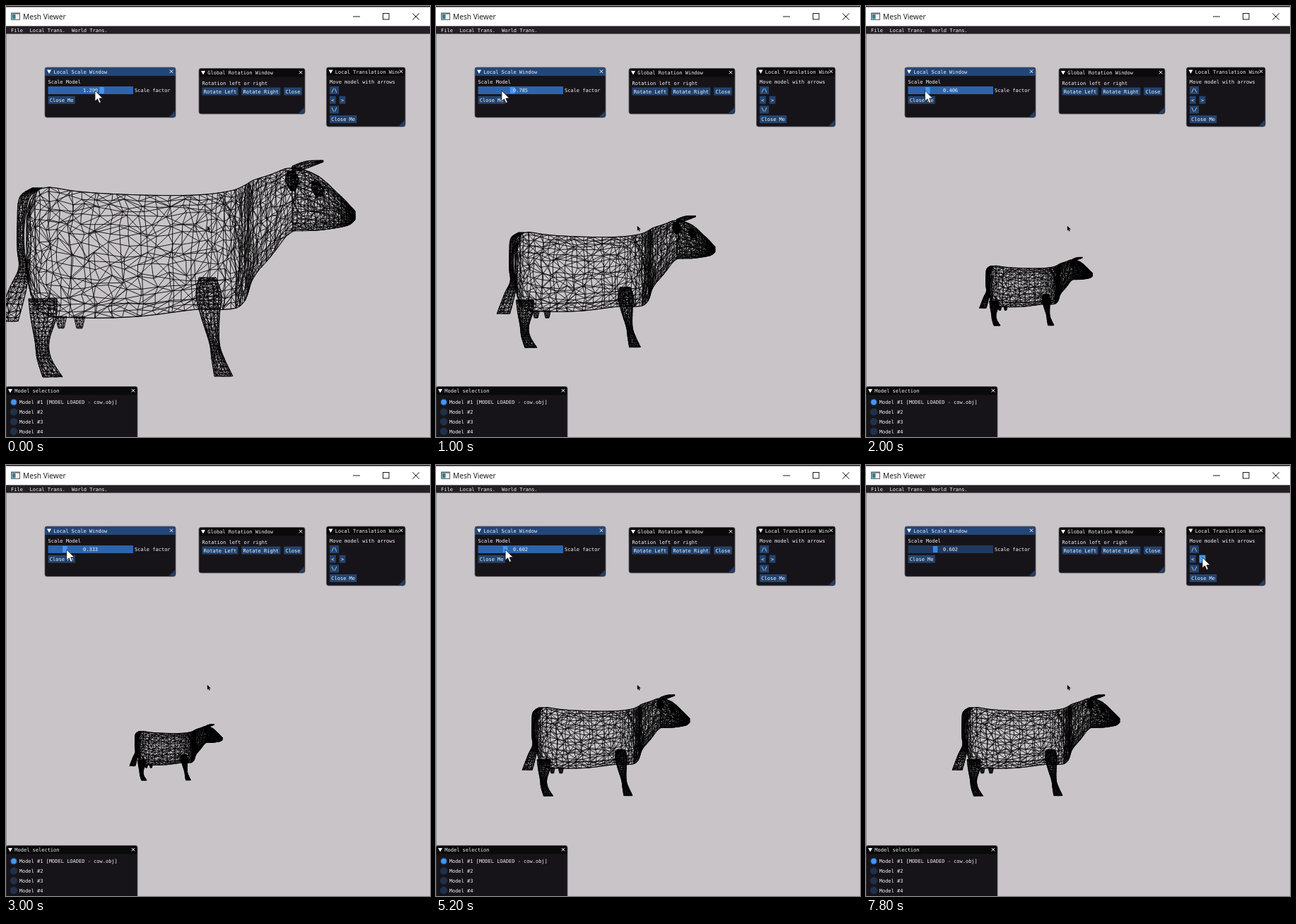
An HTML page with a canvas for the animation above (8 s loop, 600 px wide and 611 px high).

```html
<!DOCTYPE html>
<html lang="en">
<head>
<meta charset="utf-8">
<title>Mesh Viewer</title>
<style>
  html, body { margin: 0; width: 100%; height: 100%; overflow: hidden; background: #c8c4c8; }
  canvas { display: block; }
</style>
</head>
<body>
<canvas id="stage" width="600" height="611"></canvas>
<script>
const ctx = document.getElementById('stage').getContext('2d');
const LOOP = 8000, STEP = 200, RELEASE = 5400, HOVER = 7200;
const PIVOT = [240.5, 419.5], MODEL_SCALE = 1.29;
const MONO = '7px "DejaVu Sans Mono", monospace', ADVANCE = 4.21, ROW = 13.7;
const INK = '#1b191d', PANEL = '#171419', BUTTON = '#23446f', ACCENT = '#4296fa';

let seed = 7;
const random = () => (seed = (seed * 16807) % 2147483647) / 2147483647;
const jitter = amount => (random() - .5) * amount;
const mix = (a, b, k) => a + (b - a) * k;

// Catmull-Rom through a list of points, u in 0..1
function spline(points, u) {
  const last = points.length - 1;
  const pos = Math.min(Math.max(u, 0), 1) * last;
  const i = Math.min(Math.floor(pos), last - 1), f = pos - i;
  const at = n => points[Math.min(Math.max(n, 0), last)];
  const [a, b, c, d] = [at(i - 1), at(i), at(i + 1), at(i + 2)];
  return b.map((v, n) => v + f / 2 * (c[n] - a[n] +
    f * (2 * a[n] - 5 * v + 4 * c[n] - d[n] + f * (3 * (v - c[n]) + d[n] - a[n]))));
}

// Triangulated tube: the spine holds x, y, radius; sections lie along the axis.
const mesh = new Path2D();
const UPRIGHT = [0, 1], ACROSS = [1, 0];
function tube(cols, rows, [ax, ay], spine) {
  const vertex = (i, j) => {
    const [x, y, r] = spline(spine, (i + jitter(.5)) / cols);
    const v = (j % rows ? j + jitter(.6) : j) / rows;
    const side = r * mix(2 * v - 1, -Math.cos(Math.PI * v), .45);
    return [x + ax * side, y + ay * side];
  };
  const line = (a, b) => { mesh.moveTo(...a); mesh.lineTo(...b); };
  let before;
  for (let i = 0; i <= cols; i++) {
    const ring = Array.from({ length: rows + 1 }, (_, j) => vertex(i, j));
    ring.forEach((p, j) => {
      if (j) line(ring[j - 1], p);
      if (before) line(before[j], p);
      if (before && j) {
        if (random() < .5) line(before[j - 1], p);
        else line(before[j], ring[j - 1]);
      }
    });
    before = ring;
  }
}

const body = [
  [29, 337, 45], [48, 346, 88], [110, 353, 89], [190, 354, 86], [270, 349, 81],
  [318, 346, 84], [338, 336, 82], [350, 316, 69], [375, 297, 58], [405, 274, 45],
  [440, 279, 39], [470, 290, 24], [486, 296, 14], [494, 297, 6]];
const head = body.slice(-5);
const frontLeg = [[285, 385, 12], [287, 410, 18], [289, 440, 13], [295, 478, 7], [300, 500, 9], [308, 525, 13]];
const hindLeg = [[52, 415, 20], [53, 442, 18], [51, 475, 10], [54, 500, 10], [66, 526, 14]];
const tail = [[44, 258, 7], [26, 272, 7], [21, 310, 5], [21, 345, 5], [24, 372, 6], [17, 400, 12], [2, 447, 15]];

tube(52, 14, UPRIGHT, body);
tube(30, 6, UPRIGHT, body);
tube(18, 9, UPRIGHT, head);
for (let side = 0; side < 2; side++) {
  tube(24, 6, ACROSS, frontLeg);
  tube(20, 6, ACROSS, hindLeg);
  tube(34, 4, ACROSS, tail);
  tube(8, 5, ACROSS, [[404, 234, 5], [405, 248, 9], [406, 262, 3]]);        // ear
  tube(5, 4, ACROSS, [[438, 250, 5], [441, 260, 8], [443, 270, 4]]);        // eye
  tube(9, 3, UPRIGHT, [[405, 231, 4], [425, 225, 5], [449, 220, 1]]);       // horn
  tube(5, 4, ACROSS, [[78 + side * 26, 440, 8], [78 + side * 26, 457, 4]]); // udder
}
tube(16, 1, ACROSS, [[303, 268, 2], [333, 335, 4], [328, 425, 3]]);         // shoulder

// Keys are rows of time followed by values
function animate(keys, t) {
  const next = keys.findIndex(key => key[0] > t);
  if (next < 0) return keys[keys.length - 1].slice(1);
  const a = keys[next - 1], b = keys[next];
  return a.slice(1).map((v, n) => mix(v, b[n + 1], (t - a[0]) / (b[0] - a[0])));
}
const scaleAt = t => animate([
  [0, 1.29], [600, 1.054], [1400, .516], [2400, .333], [3300, .333],
  [3800, .473], [4700, .473], [5200, .602]], t)[0];
const grabX = scale => 65.3 + scale * 54.5;

// The pointer drags ahead of the slider, then leaves for the arrow buttons.
function pointerAt(t) {
  if (t < RELEASE) return [grabX(scaleAt(t + 450)), 120];
  return animate([[RELEASE, grabX(.602), 120], [6000, 432, 63], [HOVER, 476, 131]], t);
}

function box(x, y, w, h, color, radius = 0) {
  ctx.fillStyle = color;
  ctx.beginPath();
  ctx.roundRect(x, y, w, h, radius);
  ctx.fill();
}
function polygon(color, ...points) {
  ctx.fillStyle = color;
  ctx.beginPath();
  points.forEach(p => ctx.lineTo(...p));
  ctx.closePath();
  ctx.fill();
}
function disc(x, y, r, color) {
  box(x - r, y - r, 2 * r, 2 * r, color, r);
}
function label(text, x, y, color = '#f4f4f4', font = MONO) {
  ctx.font = font;
  ctx.fillStyle = color;
  ctx.fillText(text, x, y);
}
function cross(x, y, r, color) {
  ctx.strokeStyle = color;
  ctx.lineWidth = 1;
  ctx.beginPath();
  ctx.moveTo(x - r, y - r); ctx.lineTo(x + r, y + r);
  ctx.moveTo(x + r, y - r); ctx.lineTo(x - r, y + r);
  ctx.stroke();
}
function buttons(x, y, texts, hot) {
  for (const text of texts) {
    const w = text.length * ADVANCE + 4.6;
    box(x, y, w, 11, text === hot ? ACCENT : BUTTON);
    label(text, x + 2.3, y + 8);
    x += w + 4.8;
  }
}
// A panel with a heading line; returns the top of its nth row of controls.
function panel(title, heading, x, y, w, h, titleColor = '#0a0a0b') {
  box(x, y, w, h, PANEL, 3);
  box(x, y, w, 12, titleColor, [3, 3, 0, 0]);
  polygon('#fff', [x + 3, y + 3.5], [x + 9, y + 3.5], [x + 6, y + 9]);
  ctx.save();
  ctx.beginPath();
  ctx.rect(x, y, w - 9, 12);
  ctx.clip();
  label(title, x + 12.3, y + 8.6);
  ctx.restore();
  cross(x + w - 6, y + 5.7, 2.2, '#fff');
  polygon('#20406a', [x + w - 1, y + h - 9], [x + w - 1, y + h - 1], [x + w - 9, y + h - 1]);
  ctx.strokeStyle = '#56535f';
  ctx.lineWidth = .8;
  ctx.beginPath();
  ctx.roundRect(x, y, w, h, 3);
  ctx.stroke();
  label(heading, x + 4.5, y + 23);
  return n => y + 27 + n * ROW;
}

function drawCow(scale) {
  const k = scale / MODEL_SCALE;
  ctx.save();
  ctx.translate(...PIVOT);
  ctx.scale(k, k);
  ctx.translate(-PIVOT[0], -PIVOT[1]);
  ctx.lineWidth = .85 / k;
  ctx.strokeStyle = '#000';
  ctx.stroke(mesh);
  ctx.restore();
}

function drawFrame() {
  box(0, 0, 600, 28.5, '#fff');
  box(0, 0, 600, 1.5, INK);
  box(7, 9.5, 13, 10.5, '#59626a');
  box(8, 11.5, 11, 7.5, '#f4f6f7');
  box(8.5, 12, 5, 6.5, '#377f88');
  label('Mesh Viewer', 24, 19, '#111', '10.2px "Open Sans", sans-serif');
  box(491, 14.5, 10, 1, INK);
  ctx.strokeStyle = INK;
  ctx.lineWidth = 1;
  ctx.strokeRect(533.5, 10.5, 8.5, 8.5);
  cross(580, 15, 4.7, INK);
  box(0, 28.5, 600, 11, '#231f24');
  label('File', 7, 36.8);
  label('Local Trans.', 33.5, 36.8);
  label('World Trans.', 93, 36.8);
}

function drawScalePanel(scale, dragging) {
  const row = panel('Local Scale Window', 'Scale Model', 55, 87, 185, 71, '#234678');
  box(59.5, row(0), 120.5, 11, dragging ? '#2c64ae' : '#20395e');
  box(grabX(scale) - 3.3, row(0) + 1, 6.5, 9, dragging ? ACCENT : '#3d85e0');
  label(scale.toFixed(3), 109, row(0) + 8.3);
  label('Scale factor', 182, row(0) + 8.3);
  buttons(59.5, row(1), ['Close Me']);
}

function drawPanels(hot) {
  let row = panel('Global Rotation Window', 'Rotation left or right', 273, 88.5, 150, 64.5);
  buttons(277.5, row(0), ['Rotate Left', 'Rotate Right', 'Close']);

  row = panel('Local Translation Window', 'Move model with arrows', 453.5, 87, 111.5, 84);
  [['/\\'], ['<', '>'], ['\\/'], ['Close Me']].forEach((texts, n) => buttons(458, row(n), texts, hot));

  panel('Model selection', '', 0, 539.5, 186, 90);
  for (let n = 1; n <= 4; n++) {
    const y = 547.8 + n * 13.8;
    disc(11, y, 5.2, '#1f3049');
    if (n === 1) disc(11, y, 3.9, ACCENT);
    label(`Model #${n}` + (n === 1 ? ' [MODEL LOADED - cow.obj]' : ''), 18.7, y + 2.6);
  }
}

function drawPointer([x, y], size, fill) {
  ctx.save();
  ctx.translate(x, y);
  ctx.scale(size, size);
  polygon(fill, [0, 0], [0, 15], [3.5, 11.8], [6, 17.5], [8.3, 16.5], [5.9, 11], [10.8, 10.7]);
  ctx.strokeStyle = INK;
  ctx.lineWidth = .8;
  ctx.stroke();
  ctx.restore();
}

function draw(now) {
  const t = Math.floor((now % LOOP) / STEP) * STEP;
  box(0, 0, 600, 611, '#c8c4c8');
  box(0, 40, .7, 571, '#77737a');
  drawCow(scaleAt(t));
  drawPointer([285, 312], .42, '#000');
  drawFrame();
  drawScalePanel(scaleAt(t), t < RELEASE);
  drawPanels(t >= HOVER ? '>' : '');
  drawPointer(pointerAt(t), 1, '#fff');
  requestAnimationFrame(draw);
}
requestAnimationFrame(draw);
</script>
</body>
</html>
```
